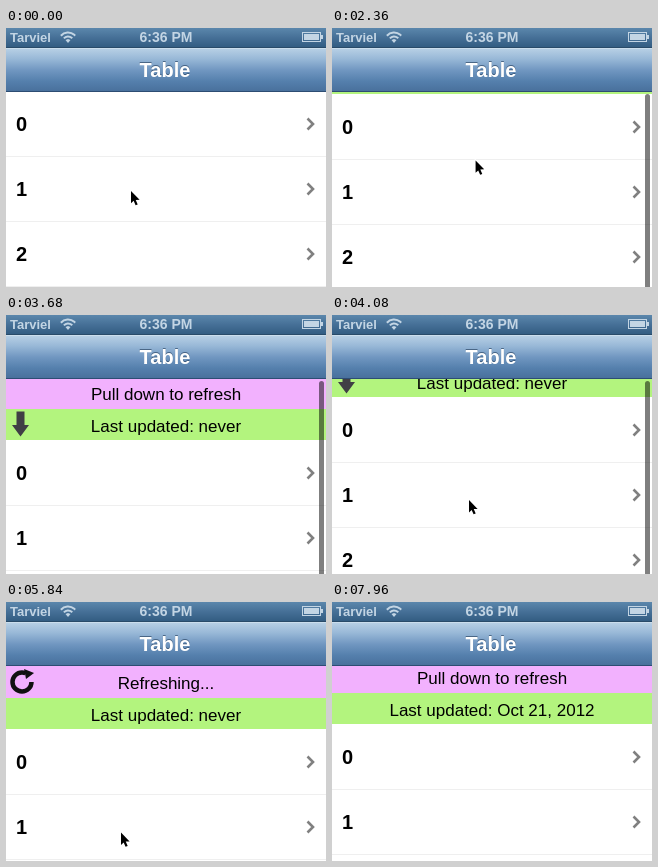
Recreate the animation shown at these times as an HTML page with a canvas. Size 320 px wide and 259 px high, loop 8 s.

```html
<!DOCTYPE html>
<html lang="en">
<head>
<meta charset="utf-8">
<title>Pull to refresh</title>
<style>
html, body { margin: 0; width: 100%; height: 100%; overflow: hidden; background: #fff; }
canvas { display: block; width: 320px; height: 259px; }
</style>
</head>
<body>
<canvas id="stage" width="320" height="259"></canvas>
<script>
const W = 320, H = 259, LOOP = 8000, TOP = 64, ROW = 65, BAND = 32;
const PRESS = 960, REPRESS = 2430, RELEASE = 4840, DONE = 7910;
const FONT = '"Liberation Sans", Arial, sans-serif';
const c = document.getElementById('stage').getContext('2d');

// [time, pull distance]
const pull = [[PRESS, 0], [2000, 40], [REPRESS, 0], [3040, 80], [3520, 80],
  [3980, 15], [4680, 92], [RELEASE, 92], [5200, 64], [DONE, 64], [DONE + 300, 0]];
// [time, x, y] of the pointer before the pull carries it down
const hand = [[40, 125, 163], [400, 134, 111], [2000, 138, 111], [REPRESS, 144, 128],
  [4080, 137, 149], [5200, 135, 149], [5840, 115, 109], [6040, 115, 109], [6760, -16, 85]];

const clamp = v => Math.max(0, Math.min(1, v));
const ease = u => u * u * (3 - 2 * u);

function track(keys, t, k = 1) {
  const i = keys.findIndex(key => key[0] > t);
  if (i === 0) return keys[0][k];
  if (i < 0) return keys[keys.length - 1][k];
  const a = keys[i - 1], b = keys[i];
  return a[k] + (b[k] - a[k]) * ease((t - a[0]) / (b[0] - a[0]));
}

function rect(x, y, w, h, fill) {
  c.fillStyle = fill;
  c.fillRect(x, y, w, h);
}

function text(s, x, y, size, fill, align = 'left', weight = 'bold') {
  c.font = `${weight} ${size}px ${FONT}`;
  c.textAlign = align;
  c.fillStyle = fill;
  c.fillText(s, x, y);
}

function path(points) {
  c.beginPath();
  points.forEach(([x, y]) => c.lineTo(x, y));
}

function poly(points, fill) {
  path(points);
  c.fillStyle = fill;
  c.fill();
}

function fade(y, h, ...colors) {
  const g = c.createLinearGradient(0, y, 0, y + h);
  colors.forEach((col, i) => g.addColorStop(i / (colors.length - 1), col));
  return g;
}

function at(x, y, angle, draw) {
  c.save();
  c.translate(x, y);
  c.rotate(angle);
  draw();
  c.restore();
}

function linen() {
  rect(0, TOP, W, 40, '#767a82');
  let seed = 7;
  const rnd = n => (seed = seed * 16807 % 2147483647) / 2147483647 * n | 0;
  for (let i = 0; i < 1200; i++) {
    const len = 2 + rnd(7), across = i % 2;
    const ink = i % 4 < 2 ? 'rgba(255,255,255,.06)' : 'rgba(0,0,0,.08)';
    rect(rnd(W), TOP + rnd(40), across ? len : 1, across ? 1 : len, ink);
  }
  rect(0, TOP, W, 4, fade(TOP, 4, 'rgba(0,0,0,.25)', 'rgba(0,0,0,0)'));
}

function spinner(x, y, angle) {
  at(x, y, angle, () => {
    c.beginPath();
    c.arc(0, 0, 9.5, 0, Math.PI * 1.62);
    c.lineWidth = 4.5;
    c.strokeStyle = '#111';
    c.stroke();
    poly([[2, -13], [12, -9], [4, -3]], '#111');
  });
}

function header(t, o) {
  const y = TOP + o - 2 * BAND;
  const done = t >= DONE, busy = t >= RELEASE && !done;
  const label = busy ? 'Refreshing...' : o > 64 ? 'Release to refresh' : 'Pull down to refresh';
  linen();
  rect(0, y, W, BAND, '#f2b1fe');
  rect(0, y + BAND, W, BAND, '#b3f47e');
  text(label, 160, y + 23, 17, '#000', 'center', 'normal');
  text('Last updated: ' + (done ? 'Oct 21, 2012' : 'never'), 160, y + BAND + 23, 17, '#000', 'center', 'normal');
  if (busy) spinner(16, y + 16, (t - 5840) / 1000 * 2 * Math.PI);
  else if (!done) {
    // half a turn once the pull passes the threshold
    at(14.5, y + BAND + 15, -Math.PI * clamp((o - 64) / 16), () =>
      poly([[-4, -12.5], [4, -12.5], [4, 1], [8.5, 1], [0, 12.5], [-8.5, 1], [-4, 1]], '#403f45'));
  }
}

function rows(o) {
  rect(0, TOP + o - 1, W, H, '#fff');
  for (let i = 0; i < 4; i++) {
    const y = TOP + o + i * ROW;
    text(i, 10, y + 39, 20, '#000');
    rect(0, y + ROW - 1, W, 1, '#efefef');
    path([[301.5, y + 26.5], [307, y + 32], [301.5, y + 37.5]]);
    c.lineWidth = 2.6;
    c.strokeStyle = '#808080';
    c.stroke();
  }
}

function bars() {
  const pale = '#c3d5e4';
  rect(0, 0, W, 20, fade(0, 20, '#5b87ac', '#456f96', '#315b80'));
  text('Tarviel', 4, 14, 13, pale);
  text('6:36 PM', 160, 14, 14, pale, 'center');
  c.strokeStyle = pale;
  c.lineWidth = 2;
  for (const r of [5.5, 9.5]) {
    c.beginPath();
    c.arc(62, 14, r, -Math.PI * .77, -Math.PI * .23);
    c.stroke();
  }
  poly([[59.5, 12], [62, 11], [64.5, 12], [62, 15]], pale);
  c.lineWidth = 1;
  c.strokeRect(296.5, 4.5, 18, 9);
  rect(298, 6, 15, 6, pale);
  rect(315, 7, 2, 4, pale);

  rect(0, 20, W, 44, fade(20, 44, '#b9d1e6', '#98b8d7', '#7197c1', '#5580ad', '#486f9b'));
  rect(0, 19, W, 1, '#294b69');
  rect(0, 20, W, 1, '#cbdeed');
  rect(0, 63, W, 1, '#2d4d73');
  text('Table', 159, 48, 20, 'rgba(30,55,85,.6)', 'center');
  text('Table', 159, 49, 20, '#fff', 'center');
}

function scrollbar(t, o) {
  c.globalAlpha = clamp((t - PRESS) / 80) * clamp((5760 - t) / 300);
  c.beginPath();
  c.roundRect(313, 66, 5, 263 - o, 2.5);
  c.fillStyle = 'rgba(0,0,0,.5)';
  c.fill();
  c.globalAlpha = 1;
}

function cursor(t, o) {
  at(track(hand, t, 1), track(hand, t, 2) + 1.9 * o, 0, () => {
    c.scale(.88, .88);
    path([[0, 0], [0, 14], [3, 11.2], [5.2, 16.2], [7.6, 15.2], [5.4, 10.2], [9.8, 10]]);
    c.closePath();
    c.strokeStyle = '#fff';
    c.lineWidth = 2;
    c.stroke();
    c.fillStyle = '#000';
    c.fill();
  });
}

// click mark that fades after the second press
function ring(t) {
  if (t < REPRESS) return;
  c.globalAlpha = clamp((3040 - t) / 200);
  c.beginPath();
  c.arc(144.5, 127.5, 27, 0, Math.PI * 2);
  c.lineWidth = 1;
  c.strokeStyle = fade(100, 55, 'rgba(90,90,150,.6)', 'rgba(150,150,220,.4)');
  c.stroke();
  c.globalAlpha = 1;
}

function draw(t) {
  const o = Math.round(track(pull, t));
  header(t, o);
  rows(o);
  scrollbar(t, o);
  bars();
  ring(t);
  cursor(t, o);
}

const start = performance.now();
function tick() {
  draw((performance.now() - start) % LOOP);
  requestAnimationFrame(tick);
}
tick();
</script>
</body>
</html>
```
